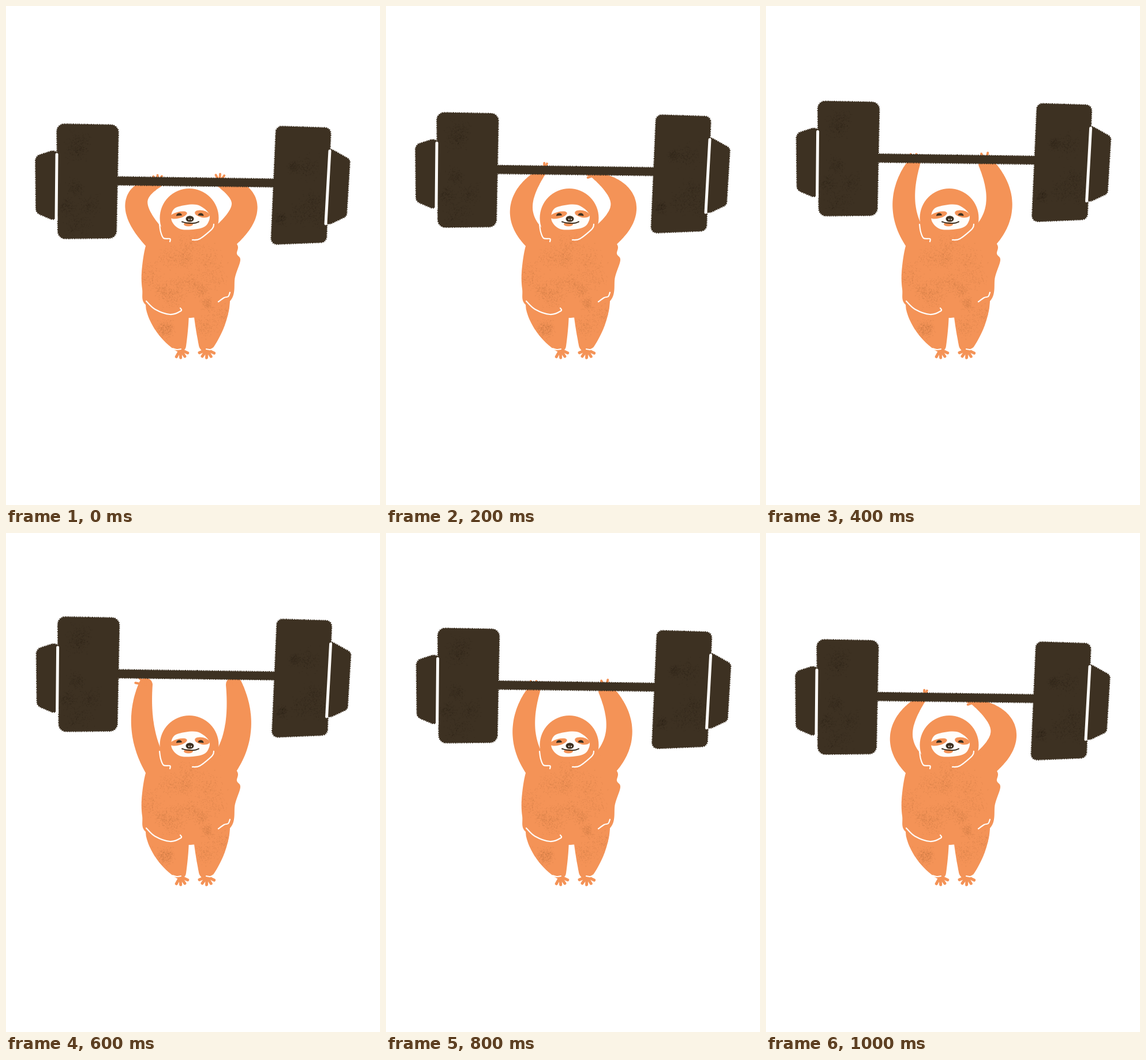
An HTML page with a canvas for the animation above (1200 ms loop, 648 by 864 pixels).

```html
<!DOCTYPE html>
<html lang="en">
<head>
<meta charset="utf-8">
<title>Lifting sloth</title>
<style>
html, body { margin: 0; width: 100%; height: 100%; overflow: hidden; background: #fff; }
canvas { display: block; width: 648px; height: 864px; }
</style>
</head>
<body>
<canvas id="stage" width="648" height="864"></canvas>
<script>
const ctx = document.getElementById('stage').getContext('2d');
const FUR = '#f49357', DARK = '#3d3122', PAPER = '#fffdfa';
const STEP = 200, LIFT = 19.7;
const ORDER = [0, 1, 2, 3, 2, 1];

function seeded(seed) {
  return () => {
    seed = (seed * 16807) % 2147483647;
    return seed / 2147483647;
  };
}

// Smooth curve through a few points
function curve(p, closed = true) {
  const n = p.length, path = new Path2D();
  const at = i => closed ? p[(i + n) % n] : p[Math.max(0, Math.min(n - 1, i))];
  path.moveTo(...p[0]);
  for (let i = 0; i < (closed ? n : n - 1); i++) {
    const a = at(i - 1), b = at(i), c = at(i + 1), d = at(i + 2);
    path.bezierCurveTo(b[0] + (c[0] - a[0]) / 6, b[1] + (c[1] - a[1]) / 6,
      c[0] - (d[0] - b[0]) / 6, c[1] - (d[1] - b[1]) / 6, ...c);
  }
  if (closed) path.closePath();
  return path;
}

// Polygon with rounded corners
function block(radius, ...corners) {
  const path = new Path2D(), [a, b] = corners;
  path.moveTo((a[0] + b[0]) / 2, (a[1] + b[1]) / 2);
  for (let i = 1; i <= corners.length; i++) {
    path.arcTo(...corners[i % corners.length], ...corners[(i + 1) % corners.length], radius);
  }
  path.closePath();
  return path;
}

// Limb from a to b, bowed through mid, tapering from radius r0 to r1
function limb(a, mid, b, r0, r1, power) {
  const path = new Path2D();
  for (let t = 0; t <= 1; t += 1 / 64) {
    const [x, y] = a.map((v, i) => {
      const bend = 2 * mid[i] - (v + b[i]) / 2;
      return (1 - t) ** 2 * v + 2 * t * (1 - t) * bend + t * t * b[i];
    });
    const r = r0 + (r1 - r0) * t ** power;
    path.moveTo(x + r, y);
    path.arc(x, y, r, 0, 7);
  }
  return path;
}

function fill(path, color) {
  ctx.fillStyle = color;
  ctx.fill(path);
}

function line(path, color, width) {
  ctx.strokeStyle = color;
  ctx.lineWidth = width;
  ctx.lineCap = ctx.lineJoin = 'round';
  ctx.stroke(path);
}

// Dark shape with a frayed edge
function iron(path) {
  fill(path, DARK);
  ctx.save();
  ctx.setLineDash([1.6, 1.7, 1.2, 1.4, 2, 1.9]);
  ctx.lineCap = 'butt';
  ctx.lineWidth = 2.2;
  ctx.strokeStyle = DARK;
  ctx.stroke(path);
  ctx.restore();
}

function oval(x, y, rx, ry, color, turn = 0, from = 0) {
  ctx.fillStyle = color;
  ctx.beginPath();
  ctx.ellipse(x, y, rx, ry, turn, from, Math.PI * 2);
  ctx.fill();
}

// Fingers or toes spread around one direction
function fan(x, y, aim, spread, count, length, width) {
  for (let i = 0; i < count; i++) {
    const a = aim + spread * (i / (count - 1) - 0.5);
    line(curve([[x, y], [x + Math.cos(a) * length, y + Math.sin(a) * length]], false), FUR, width);
  }
}

// Random dry-brush patches of specks inside a path
function grain(path, [x, y, w, h], count, color, seed) {
  const rnd = seeded(seed), soft = () => rnd() + rnd() + rnd() - 1.5;
  ctx.save();
  ctx.clip(path);
  ctx.fillStyle = color;
  for (let i = 0; i < count; i++) {
    const cx = x + rnd() * w, cy = y + rnd() * h, size = 10 + rnd() * 12;
    for (let k = 0; k < 170; k++) {
      ctx.fillRect(cx + soft() * size, cy + soft() * size, 0.7 + rnd(), 0.7 + rnd());
    }
  }
  ctx.restore();
}

const body = new Path2D();
body.ellipse(317.5, 367, 51, 51, 0, 0, 7);
body.addPath(curve([[270, 385], [370, 385], [400, 412], [400, 429], [406, 440], [397, 469], [387, 512],
  [320, 540], [246, 520], [236, 490], [236, 450], [246, 405]]));
body.addPath(limb([279, 518], [288, 554], [301, 588], 37, 11, 1.5));
body.addPath(limb([356, 512], [353, 550], [347, 586], 32, 13, 1.5));

const SHOULDERS = [[259, 403], [380, 398]];
const POSES = [
  { spread: 1.1, count: 3, arms: [
    { mid: [226, 342], hand: [263, 307], r: 8, aim: -1.6 },
    { mid: [413, 343], hand: [370, 305], r: 8, aim: -1.5 }] },
  { spread: 0.4, count: 2, arms: [
    { mid: [235, 346], hand: [274, 284], r: 6, aim: -1.35 },
    { mid: [411, 341], hand: [361, 293], r: 6, aim: 3 }] },
  { spread: 0.6, count: 2, arms: [
    { mid: [239, 341], hand: [256, 273], r: 11, aim: -1.6 },
    { mid: [404, 340], hand: [381, 273], r: 13, aim: -1.7 }] },
  { spread: 1.3, count: 3, arms: [
    { mid: [237, 336], hand: [242, 263], r: 12, aim: -2.3 },
    { mid: [402, 336], hand: [395, 263], r: 14, aim: -1.6 }] }
];

const creases = [
  [[266, 378], [268, 391], [273, 402], [284, 403], [284, 408]],
  [[360, 378], [357, 386], [336, 403], [323, 405]],
  [[243, 511], [258, 525], [284, 534], [303, 528], [302, 523]],
  [[368, 512], [378, 505], [385, 503], [388, 496]],
  [[289, 593], [296, 595], [303, 594]],
  [[347, 594], [354, 595], [360, 592]]
].map(p => curve(p, false));

const plates = [
  block(13, [88, 204], [195, 206], [191, 402], [90, 403]),
  block(10, [468, 208], [563, 211], [555, 409], [459, 413])
];
const ends = [
  block(11, [92, 247], [51, 260], [52, 358], [92, 375]),
  block(8, [555, 243], [596, 266], [590, 364], [552, 382])
];
const bar = block(1, [190, 295.5], [470, 299.5], [470, 313.5], [190, 310]);
const slits = [[[88, 257], [87, 370]], [[561, 251], [554, 377]]].map(p => curve(p, false));

function drawFace() {
  fill(curve([[288, 356], [300, 347], [330, 344], [350, 357], [352, 371], [340, 384], [305, 387], [288, 374]]), PAPER);
  oval(299, 362, 15, 5.5, FUR, -0.25);
  oval(340, 360, 13, 6, FUR, 0.2);
  oval(300, 363, 5, 4.5, DARK, -0.1, Math.PI);
  oval(337.5, 363, 5, 4.5, DARK, 0.1, Math.PI);
  oval(316, 378, 8, 3.5, FUR);
  line(curve([[305, 373.5], [312, 375.5], [326, 376], [334, 373.5]], false), DARK, 2);
  oval(318.5, 368.5, 7, 5.2, DARK);
  for (const x of [317, 321]) oval(x, 369.5, 0.9, 1.2, PAPER);
}

function drawSloth({ arms, spread, count }) {
  arms.forEach(({ mid, hand, r, aim }, side) => {
    fill(limb(SHOULDERS[side], mid, hand, side ? 24 : 21, r, 3), FUR);
    fan(...hand, aim, spread, count, r + 6, 4);
  });
  fill(body, FUR);
  fan(302, 595, 1.25, 1.65, 4, 14, 5);
  fan(348, 595, 1.6, 2.3, 5, 14, 5);
  grain(body, [250, 400, 140, 170], 16, 'rgba(178,112,62,.2)', 41);
  drawFace();
  for (const c of creases) line(c, PAPER, 2.2);
}

function drawBarbell(pose) {
  ctx.save();
  ctx.translate(pose > 1 ? 1.6 : 0, -LIFT * pose);
  for (const shape of [...ends, bar, ...plates]) iron(shape);
  plates.forEach((p, i) => grain(p, [105 + i * 370, 225, 70, 160], 6, 'rgba(30,22,14,.14)', 97 + i));
  for (const slit of slits) line(slit, PAPER, 5);
  ctx.restore();
}

let shown = -1;
function tick(now) {
  const pose = ORDER[Math.floor(now / STEP) % ORDER.length];
  if (pose !== shown) {
    shown = pose;
    ctx.fillStyle = '#fff';
    ctx.fillRect(0, 0, 648, 864);
    drawSloth(POSES[pose]);
    drawBarbell(pose);
  }
  requestAnimationFrame(tick);
}
tick(0);
</script>
</body>
</html>
```
